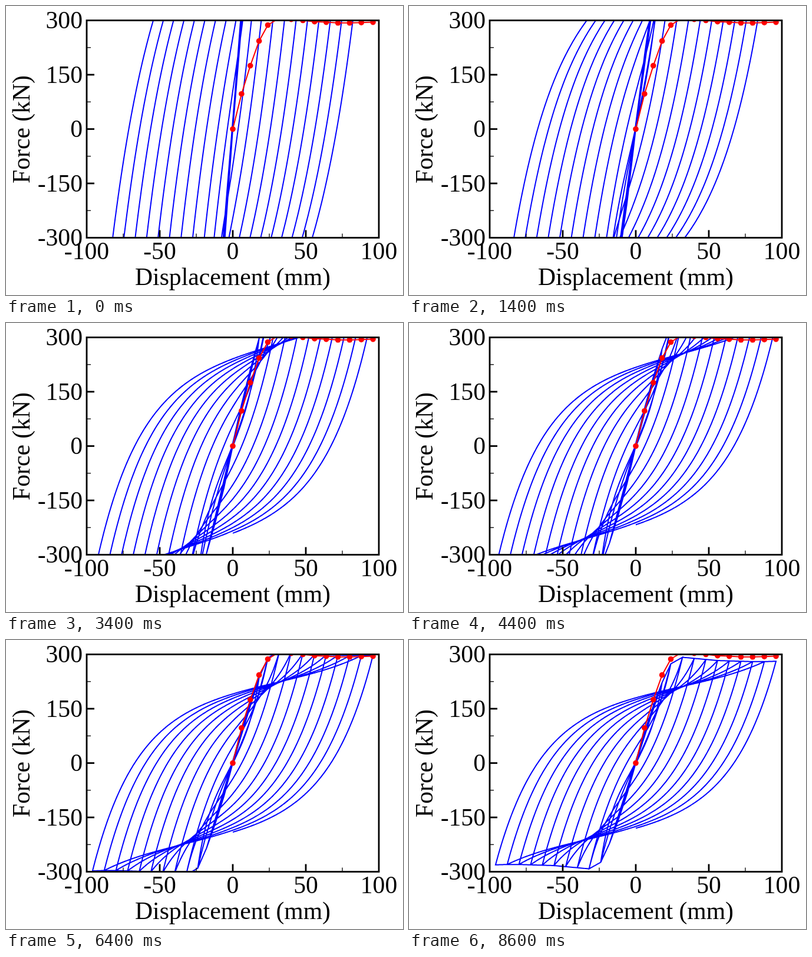
Recreate the animation shown at these times as an HTML page with a canvas. Size 674x492 px, loop 8.7 s.

```html
<!DOCTYPE html>
<html lang="en">
<head>
<meta charset="utf-8">
<title>Hysteresis loops</title>
<style>
  html, body { margin: 0; width: 100%; height: 100%; overflow: hidden; background: #fff; }
  canvas { display: block; }
</style>
</head>
<body>
<canvas id="plot" width="674" height="492"></canvas>
<script>
const ctx = document.getElementById('plot').getContext('2d');
const LOOP = 8700, STEP = 100;
const BOX = { left: 137, top: 24.5, width: 496, height: 370 };

// Peak forces (kN) at each displacement amplitude (mm): measured skeleton and unscaled loops
const amplitudes = [0, 6, 12, 18, 24, 32, 40, 48, 56, 64, 72, 80, 88, 96];
const skeleton = [0, 97, 175, 243, 287, 307, 303, 300, 296.5, 295, 293, 293, 294, 295];
const loopPeaks = [0, 86, 158, 222, 274, 292, 289, 286, 283, 282, 281, 280, 280, 281];

// Force scale over time (s), interpolated logarithmically
const scaleTimes = [0, 0.7, 2.2, 3.4, 5.4, 7.4, 8.6];
const scaleLogs = [3.9, 2.95, 1.85, 1.337, 1.09, 1.03, 1].map(Math.log);

const px = d => 385 + d * 2.48;
const py = f => 209.5 - f * 185 / 300;

function interpolate(x, xs, ys) {
  let i = 1;
  while (i < xs.length - 1 && x > xs[i]) i++;
  return ys[i - 1] + (ys[i] - ys[i - 1]) * (x - xs[i - 1]) / (xs[i] - xs[i - 1]);
}

const backbone = d => interpolate(d, amplitudes, loopPeaks);

// Force while loading from (-from) towards the last opposite peak, then along the backbone
function loadingForce(x, from, lastPeak, shift) {
  if (x >= lastPeak) return backbone(x);
  const start = backbone(from), goal = backbone(lastPeak);
  const progress = (x + from) / (from + lastPeak);
  if (from < 24) return -start + (start + goal) * progress;
  const yieldForce = 195, hardening = 0.6, softening = 29;
  const drop = yieldForce - hardening * from + start;
  const base = u => yieldForce + hardening * u - drop * Math.exp(-(u + from + shift) / softening);
  return base(x) + (goal - base(lastPeak)) * progress ** 7;
}

function halfCycle(sign, from, to, lastPeak, scale, shift) {
  const steps = Math.ceil((from + to) * 2);
  for (let i = 0; i <= steps; i++) {
    const x = -from + (from + to) * i / steps;
    ctx.lineTo(px(sign * x), py(sign * scale * loadingForce(x, from, lastPeak, shift)));
  }
}

function drawLoops(seconds) {
  const scale = Math.exp(interpolate(seconds, scaleTimes, scaleLogs));
  const shift = 9 * Math.exp(-(((seconds - 0.2) / 0.24) ** 2));
  ctx.beginPath();
  ctx.moveTo(px(0), py(0));
  for (let i = 1; i < amplitudes.length; i++) {
    const a = amplitudes[i], next = amplitudes[i + 1] ?? 0;
    halfCycle(1, a, a, amplitudes[i - 1], scale, shift);
    halfCycle(-1, a, next, a, scale, shift);
  }
  ctx.strokeStyle = '#00f';
  ctx.lineWidth = 2;
  ctx.stroke();
}

function drawSkeleton() {
  ctx.strokeStyle = ctx.fillStyle = '#f00';
  ctx.lineWidth = 2;
  ctx.beginPath();
  amplitudes.forEach((d, i) => ctx.lineTo(px(d), py(skeleton[i])));
  ctx.stroke();
  amplitudes.forEach((d, i) => {
    ctx.beginPath();
    ctx.arc(px(d), py(skeleton[i]), 4.8, 0, 2 * Math.PI);
    ctx.fill();
  });
}

function line(x1, y1, x2, y2, width) {
  ctx.lineWidth = width;
  ctx.beginPath();
  ctx.moveTo(x1, y1);
  ctx.lineTo(x2, y2);
  ctx.stroke();
}

function drawAxes() {
  const bottom = BOX.top + BOX.height;
  ctx.strokeStyle = ctx.fillStyle = '#000';
  ctx.font = '41.67px "Liberation Serif", "Times New Roman", serif';
  ctx.lineWidth = 2.8;
  ctx.strokeRect(BOX.left, BOX.top, BOX.width, BOX.height);

  for (let i = -4; i <= 4; i++) {
    const major = i % 2 === 0, x = px(i * 25), y = py(i * 75);
    const length = major ? 13 : 7, width = major ? 2.8 : 1.3;
    if (Math.abs(i) < 4) {
      line(x, bottom, x, bottom - length, width);
      line(BOX.left, y, BOX.left + length, y, width);
    }
    if (major) {
      ctx.textAlign = 'center';
      ctx.fillText(i * 25, x, 431);
      ctx.textAlign = 'right';
      ctx.fillText(i * 75, 130, y + 13.5);
    }
  }

  ctx.textAlign = 'center';
  ctx.fillText('Displacement (mm)', 385, 474.5);
  ctx.save();
  ctx.translate(39.5, 210);
  ctx.rotate(-Math.PI / 2);
  ctx.fillText('Force (kN)', 0, 0);
  ctx.restore();
}

function render(now) {
  const time = Math.floor((now % LOOP) / STEP) * STEP;
  ctx.fillStyle = '#fff';
  ctx.fillRect(0, 0, 674, 492);
  ctx.save();
  ctx.beginPath();
  ctx.rect(BOX.left, BOX.top, BOX.width, BOX.height);
  ctx.clip();
  drawLoops(time / 1000);
  drawSkeleton();
  ctx.restore();
  drawAxes();
}

const begin = performance.now();
function tick() {
  render(performance.now() - begin);
  requestAnimationFrame(tick);
}
tick();
</script>
</body>
</html>
```
